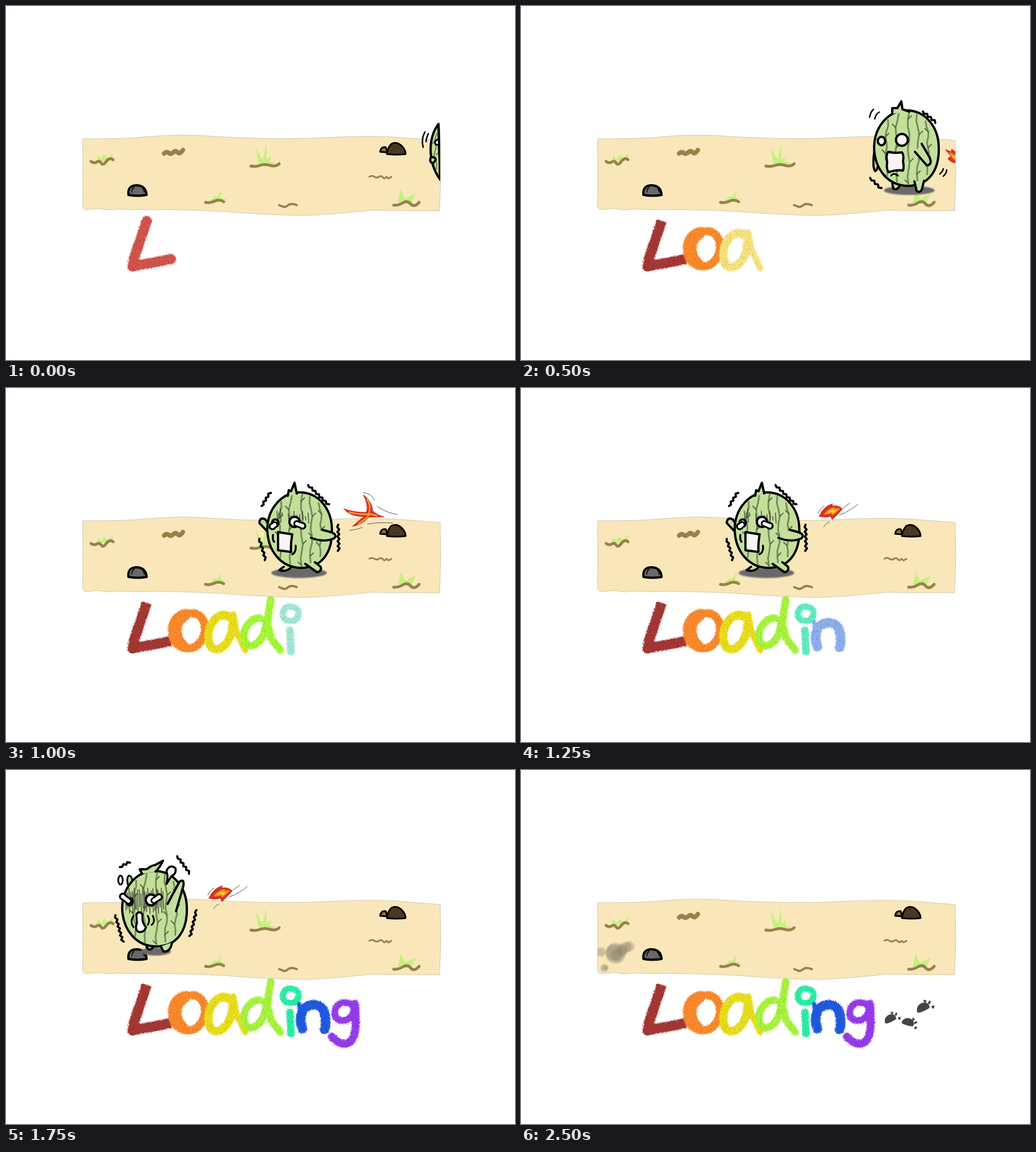
An HTML page that plays this animation: 898x624 px, repeating every 2750 ms.

```html
<!DOCTYPE html>
<html lang="en">
<head>
<meta charset="utf-8">
<title>Loading</title>
<style>
html, body { margin: 0; width: 100%; height: 100%; overflow: hidden; background: #fff; }
svg { display: block; width: 898px; height: 624px; }
path, ellipse { stroke-linecap: round; stroke-linejoin: round; }
</style>
</head>
<body>
<svg viewBox="0 0 898 624" role="img" aria-label="Loading">
  <defs>
    <filter id="crayon" filterUnits="userSpaceOnUse" x="200" y="358" width="440" height="144" color-interpolation-filters="sRGB">
      <feTurbulence type="fractalNoise" baseFrequency=".85" numOctaves="2" seed="4" result="noise"/>
      <feDisplacementMap in="SourceGraphic" in2="noise" scale="7" xChannelSelector="R" yChannelSelector="G" result="rough"/>
      <feColorMatrix in="noise" values="0 0 0 0 .15  0 0 0 0 .1  0 0 0 0 .05  2 0 0 0 -1.2"/>
      <feComposite in2="rough" operator="in" result="specks"/>
      <feMerge><feMergeNode in="rough"/><feMergeNode in="specks"/></feMerge>
    </filter>
    <filter id="soft"><feGaussianBlur stdDeviation=".8"/></filter>
    <linearGradient id="scared" x1="0" y1="0" x2=".25" y2="1">
      <stop offset="0" stop-color="#c3d3a6"/><stop offset=".4" stop-color="#86917a"/>
      <stop offset=".65" stop-color="#d3e6b8"/><stop offset="1" stop-color="#e0f0cb"/>
    </linearGradient>
    <clipPath id="strip"><rect x="135" y="100" width="631" height="300"/></clipPath>
  </defs>
  <g id="ground"></g>
  <g id="actors" clip-path="url(#strip)"></g>
  <g id="edges"></g>
  <g id="letters" filter="url(#crayon)"></g>
  <g id="paws" fill="#454446"></g>
</svg>
<script>
const STEP = 250, STEPS = 11;
const GREEN = '#c4df9b', WHITE = '#f8f4f2', BROWN = '#97814a', LEAF = '#c3f27e';
const $ = id => document.getElementById(id);

const ink = (d, width = 4, fill = 'none', stroke = '#000', extra = '') =>
  `<path d="${d}" fill="${fill}" stroke="${stroke}" stroke-width="${width}" ${extra}/>`;
const oval = (x, y, rx, ry = rx, fill = WHITE, width = 4) =>
  `<ellipse cx="${x}" cy="${y}" rx="${rx}" ry="${ry}" fill="${fill}" stroke="#000" stroke-width="${width}"/>`;
const shadow = (x, y, rx, ry) =>
  `<g filter="url(#soft)">${oval(x, y, rx, ry, '#6b696b', 0)}</g>`;
const limb = d => ink(d, 4, GREEN);
const shift = (dx, dy, art) => `<g transform="translate(${dx} ${dy})">${art}</g>`;
const tear = (x1, y1, x2, y2, fill = WHITE) => {
  const d = `M${x1} ${y1}L${x2} ${y2}`;
  return ink(d, 12) + oval(x2, y2, 5, 5, fill, 3.5) + ink(d, 6, 'none', fill);
};

function zig(x1, y1, x2, y2) {
  const length = Math.hypot(x2 - x1, y2 - y1), n = Math.round(length / 4.2);
  let d = `M${x1} ${y1}`;
  for (let i = 1; i <= n; i++) {
    const k = i / n, side = i % 2 ? 1.6 : -1.6;
    d += `L${x1 + (x2 - x1) * k - (y2 - y1) / length * side} ${y1 + (y2 - y1) * k + (x2 - x1) / length * side}`;
  }
  return ink(d, 3.8);
}

function hatch(x1, x2, y1, y2, gap = 3) {
  let d = '';
  for (let x = x1, i = 0; x < x2; x += gap, i++)
    d += `M${x} ${y1 + 5 * Math.sin(i * 2.3)}L${x + 1} ${y2 + 6 * Math.sin(i * 3.7)}`;
  return ink(d, 1.7, 'none', '#3a3f38', 'opacity=".8"');
}

function stripes(cx, cy) {
  let bands = '', twigs = '';
  [-.63, -.32, .07, .37, .67].forEach((u, s) => {
    const reach = 63 * Math.sqrt(1 - u * u);
    for (let i = 0; i <= 10; i++) {
      const y = reach * (i / 5 - 1), half = 57 * (.7 + .3 * Math.sqrt(1 - (y / 67) ** 2));
      const x = cx + u * half + 1.8 * Math.sin(i * 1.7 + s);
      bands += `${i ? 'L' : 'M'}${x} ${cy + y}`;
      if (i && (i + s) % 3 === 0) twigs += `M${x} ${cy + y}l${i % 2 ? 6 : -6} -6`;
    }
  });
  return ink(bands, 3, 'none', '#728d57') + ink(twigs, 2, 'none', '#52683f');
}

const body = (x, y, tuft) => ink(`M${x - 57} ${y}c0 -38 26 -66 57 -66c34 0 57 30 57 66c1 40 -18 67 -54 67c-36 0 -59 -30 -60 -67Z`, 4, GREEN)
  + stripes(x, y) + limb(tuft);

const peeking = () =>
  ink('M763 208C745 232 743 274 766 306Z', 4, GREEN)
  + ink('M760 225l-4 12l3 12l-4 14l5 14l-1 14M756 238l-4 5M759 262l6 -6M756 280l-4 -5', 2, 'none', '#66804e')
  + ink('M764 234Q754 238 758 244L765 246', 3, WHITE)
  + limb('M749 268Q752 265 757 268Q760 272 753 277Q747 276 749 268Z')
  + ink('M739 222Q732 235 736 249M745 225Q742 231 741 239', 2.6)
  + ink('M763 208L766 306', 4);

const startled = () => shadow(685, 325, 45, 8)
  + limb('M624 252Q619 285 625 291Q629 290 631 275') + limb('M655 313L657 322Q664 326 669 315')
  + body(680, 250, 'M655 190V180H664L671 168L673 182L685 186')
  + oval(636, 238, 6.5, 7.5) + oval(672, 236, 10.5)
  + ink('M648 257Q660 260 672 258Q676 262 674 274Q676 283 674 290Q662 288 649 293Q644 289 646 275Q643 263 648 257Z', 4, WHITE)
  + ink('M653 299Q658 293 665 299', 3)
  + limb('M695 257L716 281Q726 280 721 267L707 243') + limb('M694 309L698 326Q703 330 707 324L711 308')
  + ink('M615 196Q617 186 622 182M624 199Q626 190 632 187M739 296Q744 292 745 287M745 300Q751 295 751 289', 2.5)
  + zig(709, 186, 732, 205) + zig(616, 303, 635, 322);

const fleeing = () => shadow(596, 328, 43, 10)
  + limb('M538 253L522 270Q524 278 533 274L541 262') + limb('M564 310L562 320Q568 326 578 320L580 312')
  + body(593, 249, 'M571 188L577 176L582 181L597 169L591 184')
  + oval(550, 237, 6, 8) + oval(584, 234, 10.5)
  + ink('M610 218Q604 232 608 236Q616 237 614 230Z', 2.5, WHITE)
  + ink('M552 255L582 256Q578 275 582 287L554 285Z', 4, WHITE)
  + ink('M591 260Q587 267 590 276M548 272V281', 3.5)
  + limb('M608 262Q620 269 637 272Q645 270 638 264L620 244') + limb('M605 313L617 325Q627 328 626 318L622 306')
  + ink('M517 226Q517 218 521 213M526 226Q526 219 528 214M667 268Q666 274 668 280M672 268Q675 275 671 281', 2.5)
  + zig(627, 181, 648, 207) + zig(534, 291, 548, 317);

const crying = () => shadow(517, 326, 49, 9)
  + limb('M463 255L447 238Q448 226 458 232L465 244') + limb('M490 315L482 321Q495 325 503 316')
  + body(518, 250, 'M497 190L499 180L503 182L509 167L513 186')
  + hatch(478, 490, 217, 231) + hatch(498, 538, 222, 234, 5)
  + oval(475, 238, 5.5, 6.5) + tear(474, 241, 470, 244) + oval(509, 236, 9) + tear(513, 239, 523, 243)
  + ink('M480 254L505 258Q502 274 503 289L480 286Z', 4, WHITE)
  + ink('M471 259Q470 268 473 271M511 278Q512 290 505 293', 3.5)
  + limb('M538 264Q560 273 579 265Q585 258 573 254L558 250') + limb('M528 310L549 325Q558 322 555 315L545 307')
  + zig(451, 208, 466, 184) + zig(533, 171, 569, 206) + zig(447, 266, 458, 303) + zig(586, 241, 587, 287);

const panicking = leftMark => shadow(352, 325, 27, 7)
  + limb('M336 317Q341 326 348 317')
  + ink('M303 207Q300 192 306 191Q312 194 310 205', 3, GREEN)
  + body(350, 249, 'M328 188L324 180H336Q347 172 350 173L365 165Q360 176 352 184')
  + hatch(299, 366, 218, 252)
  + oval(306, 237, 5.5, 6.5) + tear(304, 236, 294, 228) + oval(344, 234, 9.5) + tear(349, 235, 358, 229)
  + ink('M318 259Q324 252 329 260Q327 274 335 282Q331 293 321 290Q315 285 319 275Z', 3.5, WHITE)
  + ink('M313 262Q306 273 313 282M338 262Q343 270 338 278M347 262Q352 272 345 278', 3)
  + limb('M373 241L394 202Q403 196 401 209L388 254') + limb('M361 316L366 325Q378 326 381 309')
  + ink('M371 206Q375 192 371 183Q377 170 387 178Q389 188 380 192Z', 3.5, WHITE) + oval(290, 199, 4, 8, WHITE, 3)
  + (leftMark ? zig(253, 223, 266, 201) : '')
  + zig(289, 176, 306, 167) + zig(390, 157, 412, 187) + zig(281, 261, 294, 308) + zig(424, 252, 413, 298);

const leaving = () => shadow(181, 314, 9, 5)
  + limb('M150 303L153 310Q160 312 164 304')
  + ink('M136 172C175 168 205 190 215 225C222 250 217 275 211 290C185 305 160 306 136 303Z', 4, 'url(#scared)')
  + ink('M158 175l8 20l-3 18l8 25l-4 30l5 30M185 188l4 22l12 28l-3 25l5 14M166 195l6 -5M171 238l-6 -4M168 268l7 -6M198 262l8 -8', 2.4, 'none', '#62715a')
  + hatch(138, 183, 204, 246)
  + limb('M137 167L157 162Q149 166 145 173')
  + oval(148, 224, 11) + tear(165, 219, 174, 214, '#9ba18f') + oval(148, 224, 10, 10, '#f3e9e6', 3)
  + ink('M136 259L147 252Q150 263 160 259Q167 264 161 271Q165 282 154 279Q148 280 149 287L136 285', 3, WHITE)
  + ink('M186 230L187 246L183 268Q184 276 192 268Q200 258 200 230', 3.5, '#bac8a5')
  + ink('M185 203L196 186Q206 182 208 190Q204 198 185 203Z', 3.5, '#e6f0da')
  + ink('M190 290Q196 281 201 278L212 290Q213 298 204 298', 3.5, '#e0f0cb')
  + oval(222, 161, 4.5, 5.5, '#fff', 3.2);

const fire = (shape, core, lines) => ink(shape, 1, '#d93425', '#c42d22')
  + ink(core, 2.5, '#fbd33c', '#f28a1e') + ink(lines, 1, 'none', '#555');
const sparkFlame = () => fire('M708 236Q718 225 733 230L731 233L746 238Q738 241 735 247Q718 250 708 236Z',
  'M719 237Q727 233 738 238Q728 242 719 237Z', 'M741 230Q748 229 750 225M748 232Q757 230 760 226M750 245Q760 246 764 249');
const forkFlame = () => fire('M596 213Q616 220 636 219Q640 205 630 188Q646 200 647 217Q656 225 667 227Q648 227 639 228Q630 240 611 244Q622 234 631 227Q606 226 596 213Z', '',
  'M630 184Q645 186 650 198M655 209Q672 220 690 223M606 251Q618 250 628 246M638 240Q660 236 682 238')
  + ink('M606 219Q628 224 640 222Q645 208 637 196M654 225L642 222Q634 232 622 239', 2.4, 'none', '#f5a62c');
const dartFlame = () => fire('M442 226Q450 208 466 204L464 208Q476 206 483 213Q476 222 465 232L462 226Q452 229 442 226Z',
  'M452 222Q458 214 469 211L467 214L477 213Q470 220 466 223L464 220Z',
  'M440 221Q444 212 451 208M484 212L496 203M478 224Q498 216 510 205M450 245Q453 239 460 236');

function smoke(strength) {
  const puffs = [[167, 323, 18], [164, 322, 14], [170, 326, 11], [184, 313, 10], [191, 311, 9], [178, 318, 10], [141, 321, 8], [147, 349, 7], [149, 348, 4]];
  return `<g filter="url(#soft)" fill="#6d6757" opacity="${strength}">`
    + puffs.map(([x, y, r]) => `<circle cx="${x}" cy="${y}" r="${r}" opacity=".4"/>`).join('') + '</g>';
}

const scenes = [
  peeking,
  () => shift(66, 0, startled()),
  () => startled() + fire('M749 253L759 257L760 252L767 258V277Q757 275 753 269L758 265Z', 'M757 259L767 265V271Q760 268 757 259Z', ''),
  () => fleeing() + sparkFlame(),
  () => crying() + forkFlame(),
  () => shift(-84, 0, crying()) + shift(84, 0, dartFlame()),
  () => panicking(true) + dartFlame(),
  () => shift(-88, -5, panicking(false)) + shift(-84, 0, dartFlame()),
  leaving,
  () => smoke(1),
  () => smoke(.8)
];

// Each letter: first step, colours by age, then strokes as [path, width].
const letters = [
  [0, ['#d4544c', '#b03b38', '#a53734'], ['M248 379L226 445L223 459L291 446', 18]],
  [1, ['#fbb175', '#fc8a2b'], ['M326 397C300 394 291 415 293 433C295 453 312 462 328 458C346 453 354 431 350 415C347 403 339 397 326 397Z', 14], ['M316 402C297 412 297 440 313 453', 17]],
  [2, ['#f8e57f', '#f7dd37', '#ebe01c'], ['M386 400C368 400 355 422 357 442C359 463 374 465 386 453C398 441 403 417 398 404Z', 15], ['M401 399L406 428L422 462', 11]],
  [3, ['#bff682', '#a4fb36', '#a9f63c'], ['M449 406C433 404 419 422 420 439C421 457 434 458 445 448C456 437 461 419 458 408', 13], ['M467 374L461 414L468 442L484 462', 13]],
  [4, ['#a4e9d8', '#60eec2', '#29efaa'], ['M505 386C494 382 487 394 489 402C493 413 508 413 515 404C518 395 516 387 505 386Z', 11], ['M501 427L503 465', 13]],
  [5, ['#8fb0f0', '#1e5be2'], ['M523 456C517 440 520 422 531 417C545 410 559 415 562 429C565 442 565 450 562 457', 17], ['M517 412L519 440', 7]],
  [6, ['#b785ee', '#963bed'], ['M598 410C586 409 579 421 580 431C582 441 595 445 605 438C616 430 619 410 598 410Z', 12], ['M616 412C617 440 621 475 602 482C592 485 580 477 575 470', 14]]
];

const drawLetters = step => letters.filter(([start]) => step >= start).map(([start, colors, ...strokes]) => {
  const color = colors[Math.min(step - start, colors.length - 1)];
  const cap = start || !step ? 'round' : 'butt';
  return strokes.map(([d, w]) => ink(d, w, 'none', color, `style="stroke-linecap:${cap}"`)).join('');
}).join('');

const paw = '<path d="M642 446Q640 435 650 431Q662 429 662 439Q655 444 645 447Z"/>'
  + '<path d="M652 426l5 1l-1 5l-3 -2ZM659 431l3 -4l2 2l-2 5ZM665 436l5 -1l-1 5l-3 0Z"/>';
const pawPlaces = ['', 'translate(687 446) rotate(40) translate(-655 -437)', 'translate(712 417) scale(1.1) translate(-654 -437)'];

// The black cut where the body meets the end of the strip.
const edges = { 1: 'M767 187V314', 8: 'M137.5 167L136 303' };

$('ground').innerHTML =
  ink('M136 234Q200 234 230 232Q310 224 370 230Q450 235 540 233Q650 227 700 232L766 237L767 300L765 361Q700 361 645 360Q540 371 505 369Q440 367 380 362Q300 358 230 359L195 358Q185 361 165 357L140 359Q134 356 135 350Q136 300 135 240Z', .6, '#f9e7ba', '#b5aa98')
  + [['M160 273L163 263L168 271L173 262L180 268L189 260L187 272Z', 'M150 274Q155 278 160 275T168 277T177 274T189 271'],
     ['M446 280L441 251L453 272L459 244L459 272L468 265L465 274L478 278Z', 'M432 282Q440 284 448 281T466 281T482 278'],
     ['M358 344L369 335L372 338L380 326L378 338L390 341Z', 'M352 346Q360 348 368 344T384 345'],
     ['M692 346L696 324L704 340L722 331L716 346Z', 'M684 351Q692 352 700 347T714 349T729 346']]
    .map(([leaf, soil]) => ink(leaf, .5, LEAF, LEAF) + ink(soil, 5, 'none', BROWN)).join('')
  + ink('M279 260q4 -4 8 -1t8 -1t8 0t9 -4', 8, 'none', BROWN)
  + ink('M641 301q5 -3 9 0t8 0t7 1t6 -1l4 3l5 -3', 3, 'none', BROWN)
  + ink('M482 351q5 2 8 3t8 -3t15 0', 4, 'none', BROWN)
  + ink('M216 333Q214 316 231 316Q247 317 248 333Q232 336 216 333Z', 4, '#696969')
  + ink('M222 328Q222 322 226 320M240 320Q243 323 244 328', 1.5)
  + ink('M660 257Q662 247 670 249L673 258Z', 3, '#8a7636')
  + ink('M672 261Q673 250 680 243Q688 239 695 244Q705 252 705 261Q690 263 672 261Z', 3, '#4b3821');

let shown = -1;
function render() {
  const step = Math.floor(performance.now() % (STEP * STEPS) / STEP);
  if (step !== shown) {
    shown = step;
    $('actors').innerHTML = scenes[step]();
    $('edges').innerHTML = edges[step] ? ink(edges[step], 4) : '';
    $('letters').innerHTML = drawLetters(step);
    $('paws').innerHTML = pawPlaces.slice(0, Math.max(0, step - 7)).map(t => `<g transform="${t}">${paw}</g>`).join('');
  }
  requestAnimationFrame(render);
}
render();
</script>
</body>
</html>
```
